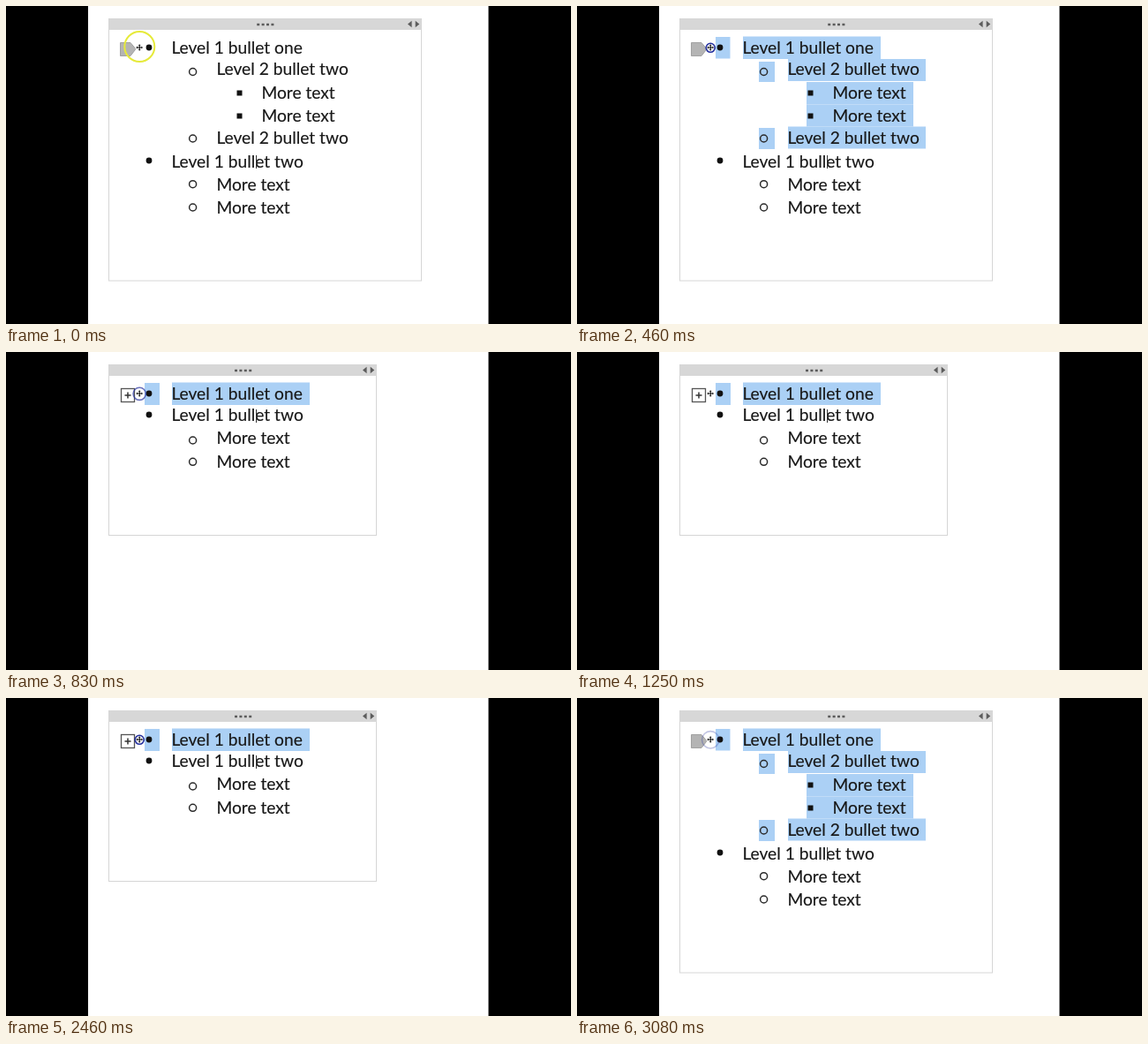
Animation of 640x360 px, one loop 3.12 s. Source, as an HTML page:

```html
<!DOCTYPE html>
<html lang="en">
<head>
<meta charset="utf-8">
<title>Collapsing a bulleted outline</title>
<style>
  html, body { margin: 0; width: 100%; height: 100%; overflow: hidden; background: #000; }
  svg { display: block; width: 100%; height: 100%; }
  text { font: 19.2px Lato, Carlito, sans-serif; fill: #181818; stroke: #181818; stroke-width: .15px; }
  .sel rect { fill: #abd0f5; }
  .hollow { fill: none; stroke: #2a2a2a; stroke-width: 1.5; }
  .frame { fill: #fff; stroke: #d6d6d6; }
  .bar { fill: #d7d7d7; }
  .grip { fill: #5c5c5c; }

  .expanded, .collapsed, .picked, .halo, .press {
    animation: 3120ms step-end infinite;
  }
  .expanded { animation-name: expanded; }
  .collapsed { animation-name: collapsed; }
  .picked { animation-name: picked; }
  .halo { animation-name: halo; animation-timing-function: linear; fill: none; stroke: #e6ea3a; stroke-width: 2; }
  .press { animation-name: press; animation-timing-function: linear; fill: none; stroke: #222e9e; stroke-width: 1.6; }

  @keyframes expanded { 0%, 79.81% { opacity: 1 } 16.02% { opacity: 0 } 100% { opacity: 1 } }
  @keyframes collapsed { 0%, 79.81% { opacity: 0 } 16.02% { opacity: 1 } 100% { opacity: 0 } }
  @keyframes picked { 0% { opacity: 0 } 1.28%, 100% { opacity: 1 } }
  @keyframes halo {
    0%, 1.28% { r: 17px; opacity: 1 }
    9.29%, 100% { r: 22px; opacity: 0 }
  }
  @keyframes press {
    0%, 2.87% { r: 5px; opacity: 0 }
    2.88%, 20.19% { r: 5px; opacity: 1 }
    40.06% { r: 11.5px; opacity: 0 }
    40.07%, 68.26% { r: 5px; opacity: 0 }
    68.27%, 84.29% { r: 5px; opacity: 1 }
    100% { r: 10.1px; opacity: .21 }
  }
</style>
</head>
<body>
<svg viewBox="0 0 640 360">
  <defs>
    <path id="grips" class="grip" d="M-9.5 19.7h3v2.6h-3zm5.4 0h3v2.6h-3zm5.4 0h3v2.6h-3zm5.4 0h3v2.6h-3z"/>
    <path id="arrows" class="grip" d="M-7.3 20.5l4.6-3.8v7.6zM6 20.5l-4.6-3.8v7.6z"/>
    <circle id="dot" r="3.4" fill="#111"/>
    <circle id="ring" r="4" class="hollow"/>
    <rect id="square" x="-3" y="-3" width="6" height="6" fill="#111"/>
  </defs>

  <rect x="93" width="453.5" height="360" fill="#fff"/>

  <g class="expanded">
    <rect class="frame" x="116.5" y="14.5" width="354" height="296.5"/>
    <rect class="bar" x="116" y="14" width="355" height="13"/>
    <use href="#grips" x="293.7"/>
    <use href="#arrows" x="462.3"/>
    <g class="picked sel">
      <rect x="157" y="35" width="16.5" height="24.5"/>
      <rect x="188" y="34.5" width="156" height="25.5"/>
      <rect x="206" y="63" width="18" height="23"/>
      <rect x="239" y="60" width="156" height="25"/>
      <rect x="260" y="86" width="121" height="25.5"/>
      <rect x="260" y="111.5" width="121" height="25"/>
      <rect x="206" y="138" width="18" height="24"/>
      <rect x="239" y="136.5" width="156" height="25"/>
    </g>
    <path d="M129.5 41.5h11.5l6 7.2-6 7.8h-11.5z" fill="#b4b4b4" stroke="#a2a2a2"/>
    <use href="#dot" x="162" y="47"/>
    <use href="#ring" x="211.6" y="74.5"/>
    <use href="#square" x="264.5" y="98.5"/>
    <use href="#square" x="264.5" y="124.5"/>
    <use href="#ring" x="211.6" y="150"/>
    <use href="#dot" x="162" y="175"/>
    <use href="#ring" x="211.6" y="201.7"/>
    <use href="#ring" x="211.6" y="228"/>
    <text x="187.4" y="54">Level 1 bullet one</text>
    <text x="238.4" y="78">Level 2 bullet two</text>
    <text x="289.4" y="105">More text</text>
    <text x="289.4" y="131">More text</text>
    <text x="238.4" y="156">Level 2 bullet two</text>
    <text x="187.4" y="183">Level 1 bullet two</text>
    <text x="238.4" y="208.5">More text</text>
    <text x="238.4" y="235.3">More text</text>
    <path d="M283.5 169v15" stroke="#333"/>
  </g>

  <g class="collapsed">
    <rect class="frame" x="116.5" y="14.5" width="303" height="193"/>
    <rect class="bar" x="116" y="14" width="304" height="13"/>
    <use href="#grips" x="268.5"/>
    <use href="#arrows" x="411.3"/>
    <g class="sel">
      <rect x="157" y="35" width="17" height="25"/>
      <rect x="188" y="34.5" width="156" height="25.5"/>
    </g>
    <rect x="130.5" y="41.5" width="15" height="15" fill="#fff" stroke="#555" stroke-width="1.3"/>
    <path d="M134.5 49h7M138 45.5v7" stroke="#333" stroke-width="1.5"/>
    <use href="#dot" x="162" y="47"/>
    <use href="#dot" x="162" y="71"/>
    <use href="#ring" x="211.6" y="100"/>
    <use href="#ring" x="211.6" y="124.3"/>
    <text x="187.4" y="54">Level 1 bullet one</text>
    <text x="187.4" y="78.3">Level 1 bullet two</text>
    <text x="238.4" y="104">More text</text>
    <text x="238.4" y="131">More text</text>
    <path d="M283.5 65v15" stroke="#333"/>
  </g>

  <circle class="halo" cx="151.3" cy="46" r="17"/>
  <circle cx="151.2" cy="47" r="4.2" fill="#fff" opacity=".85"/>
  <path d="M148.4 47h5.6M151.2 44.2v5.6" stroke="#111" stroke-width="1.1"/>
  <path d="M151.2 43.2l1.4 1.6h-2.8zM151.2 50.8l1.4-1.6h-2.8zM147.4 47l1.6-1.4v2.8zM155 47l-1.6-1.4v2.8z" fill="#111"/>
  <circle class="press" cx="151.2" cy="47.3" r="5"/>
</svg>
</body>
</html>
```
